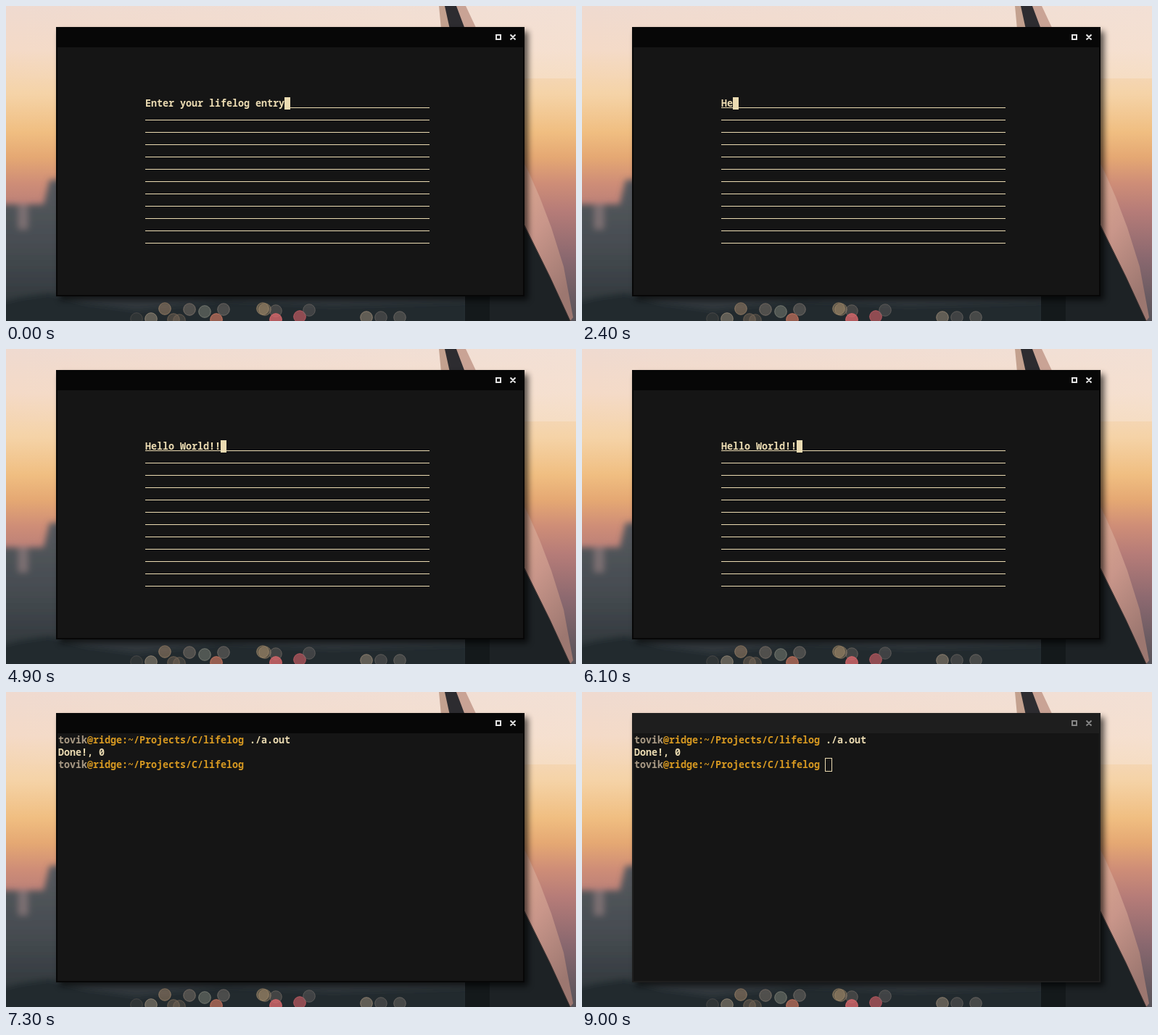
An HTML page that plays this animation: 786x435 px, repeating every 9100 ms.

```html
<!DOCTYPE html>
<html lang="en">
<head>
<meta charset="utf-8">
<title>Terminal journal</title>
<style>
  html, body { margin: 0; width: 100%; height: 100%; overflow: hidden; background: #2b3034; }
  svg { display: block; }
  text { font: bold 13.333px "Noto Sans Mono", "DejaVu Sans Mono", monospace; fill: #ebdbb2; white-space: pre; }
  .user { fill: #a89984; }
  .path { fill: #d79921; }
  .frame { fill: #070707; }
  .icon { stroke: #e2e2e2; stroke-width: 2; fill: none; }
  .idle .frame { fill: #1e1e1e; }
  .idle .icon { stroke: #858585; }
</style>
</head>
<body>
<svg id="stage" width="786" height="435" viewBox="0 0 786 435">
  <defs>
    <linearGradient id="sky" x2="0" y2="1">
      <stop offset="0" stop-color="#efdad0"/>
      <stop offset=".14" stop-color="#f4dac7"/>
      <stop offset=".28" stop-color="#f5d3a7"/>
      <stop offset=".4" stop-color="#f0be81"/>
      <stop offset=".48" stop-color="#e5a873"/>
      <stop offset=".56" stop-color="#cf8e77"/>
      <stop offset=".65" stop-color="#b67c78"/>
      <stop offset=".8" stop-color="#8a686f"/>
      <stop offset="1" stop-color="#565359"/>
    </linearGradient>
    <linearGradient id="city" x2="0" y2="1">
      <stop offset="0" stop-color="#575a5f"/>
      <stop offset=".45" stop-color="#454b50"/>
      <stop offset=".75" stop-color="#343a3f"/>
      <stop offset="1" stop-color="#2c3237"/>
    </linearGradient>
    <linearGradient id="wing" x2=".35" y2="1">
      <stop offset="0" stop-color="#dfac91"/>
      <stop offset=".5" stop-color="#c9968a"/>
      <stop offset="1" stop-color="#9c7770"/>
    </linearGradient>
    <linearGradient id="haze">
      <stop offset="0" stop-color="#f7e9de" stop-opacity="0"/>
      <stop offset="1" stop-color="#f7e9de" stop-opacity=".4"/>
    </linearGradient>
    <filter id="soft"><feGaussianBlur stdDeviation="4"/></filter>
    <filter id="edge"><feGaussianBlur stdDeviation=".6"/></filter>
    <filter id="shadow" x="-10%" y="-10%" width="120%" height="120%"><feGaussianBlur stdDeviation="4"/></filter>
  </defs>

  <rect width="786" height="435" fill="url(#sky)"/>
  <rect width="786" height="100" fill="url(#haze)"/>
  <g filter="url(#soft)">
    <path d="M-20 274H52L60 240H90V280H640V460H-20Z" fill="url(#city)"/>
    <path d="M17 274H30V308H17Z" fill="#7b7072"/>
    <path d="M-20 412L20 402 60 396 110 410 180 420 300 406 450 414 640 408V460H-20Z" fill="#23292d"/>
  </g>
  <g filter="url(#edge)">
    <path d="M597 0H607L614 32H600Z" fill="#c3a18f"/>
    <path d="M605 0H622L634 32H612Z" fill="#2d2c30"/>
    <path d="M621 0H634L649 32H633Z" fill="#c9a395"/>
    <path d="M633 390H700V290L715 303 750 374 779 435H633Z" fill="#1d2225"/>
    <path d="M633 390H667V435H633Z" fill="#14191b"/>
    <path d="M710 208L722 232 736 264 752 306 769 360 782 430 778 435 750 374 712 298Z" fill="url(#wing)"/>
    <path d="M715 303L750 374 778 435" stroke="#38302f" fill="none"/>
  </g>
  <g id="bokeh"></g>

  <rect x="74" y="35" width="646" height="371" filter="url(#shadow)" opacity=".65"/>
  <rect class="frame" x="69" y="29" width="646" height="372"/>
  <rect x="71" y="57" width="642" height="342" fill="#151515"/>
  <path class="icon" d="M676 40h6v6h-6zM695.5 39.5l7 7m0-7l-7 7"/>

  <g id="editor">
    <g id="rules" fill="#ebdbb2"></g>
    <text id="entry" x="192" y="139"></text>
  </g>
  <g id="shell">
    <text x="72" y="71"><tspan class="user">tovik</tspan><tspan class="path">@ridge:~/Projects/C/lifelog</tspan> ./a.out</text>
    <text x="72" y="88">Done!, 0</text>
    <text x="72" y="105"><tspan class="user">tovik</tspan><tspan class="path">@ridge:~/Projects/C/lifelog</tspan></text>
  </g>
  <rect id="cursor" width="8" height="17" fill="#ebdbb2"/>
  <rect id="outline" x="335.5" y="91.5" width="9" height="18" fill="none" stroke="#ebdbb2"/>
</svg>
<script>
const $ = id => document.getElementById(id);
const LOOP = 9100, BLINK = 600, EXIT = 6680, BLUR = 8950;
const CELL = 8, LEFT = 192, RIGHT = 584;
const PROMPT = "Enter your lifelog entry", MESSAGE = "Hello World!!";
const keyTime = i => i < 11 ? 2220 + 150 * i : 4600 + 150 * (i - 11);
const keys = [...MESSAGE].map((_, i) => keyTime(i));

function add(parent, tag, attrs) {
  const el = document.createElementNS("http://www.w3.org/2000/svg", tag);
  for (const name in attrs) el.setAttribute(name, attrs[name]);
  return parent.appendChild(el);
}

const show = (el, on) => el.setAttribute("visibility", on ? "visible" : "hidden");

// x, y, colour, opacity
const lights = [
  [180, 432, "#6b6259", .2], [200, 432, "#a0927e", .5], [219, 418, "#9c8268", .55],
  [231, 433, "#89735f", .4], [239, 434, "#89735f", .3], [253, 419, "#8a7d72", .45],
  [274, 422, "#8b8d80", .45], [290, 433, "#c7755f", .7], [300, 419, "#8a8078", .4],
  [354, 418, "#a58d6c", .5], [357, 419, "#a58d6c", .4], [372, 421, "#80766e", .35],
  [372, 433, "#d9686b", .8], [405, 429, "#b5585f", .75], [418, 420, "#77706d", .35],
  [497, 430, "#a08f7b", .5], [517, 430, "#77716b", .35], [543, 430, "#7f7770", .4]
];
for (const [cx, cy, color, a] of lights)
  add($("bokeh"), "circle", {
    cx, cy, r: 8.3, fill: color, stroke: color, "fill-opacity": a, "stroke-opacity": Math.min(1, a + .25)
  });

const rules = Array.from({ length: 12 }, (_, i) =>
  add($("rules"), "rect", { x: LEFT, y: 140 + 17 * i, width: RIGHT - LEFT, height: 1 }));

function draw(now) {
  const t = now % LOOP;
  const typed = keys.filter(k => k <= t).length;
  const done = t >= EXIT, idle = t >= BLUR;
  const text = typed ? MESSAGE.slice(0, typed) : PROMPT;
  const end = LEFT + CELL * text.length;
  const lastKey = done ? EXIT : typed ? keys[typed - 1] : 0;

  $("stage").classList.toggle("idle", idle);
  show($("editor"), !done);
  show($("shell"), done);
  $("entry").textContent = text;

  const start = typed ? LEFT : end;
  rules[0].setAttribute("x", start);
  rules[0].setAttribute("width", RIGHT - start);

  $("cursor").setAttribute("x", done ? 336 : end);
  $("cursor").setAttribute("y", done ? 92 : 126);
  show($("cursor"), !idle && Math.floor((t - lastKey) / BLINK) % 2 === 0);
  show($("outline"), idle);
}

const began = performance.now();
function tick() {
  draw(performance.now() - began);
  requestAnimationFrame(tick);
}
tick();
</script>
</body>
</html>
```
